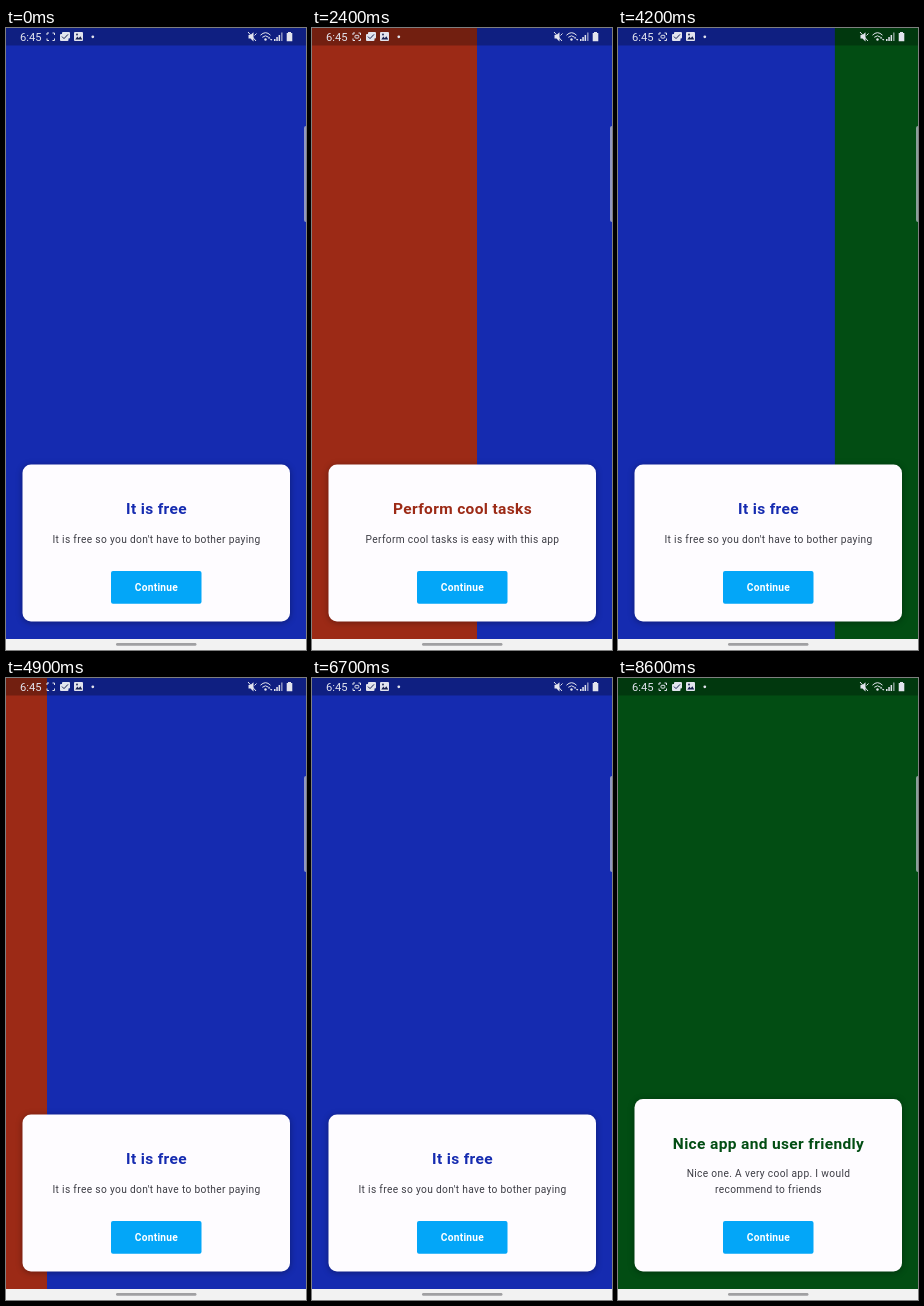
Recreate the animation shown at these times as an HTML page. Size 300x622 px, loop 8.7 s.

```html
<!DOCTYPE html>
<html lang="en">
<head>
<meta charset="utf-8">
<title>Onboarding</title>
<style>
  html, body { margin: 0; width: 100%; height: 100%; overflow: hidden; background: #152bb0; }
  svg { display: block; width: 100%; height: 100%; font-family: Roboto, sans-serif; }
  .card { fill: #fefcff; filter: drop-shadow(0 1px 3px rgba(0, 0, 0, .35)); }
  .title { font-size: 15.5px; font-weight: 700; letter-spacing: .35px; }
  .body { font-size: 10.2px; letter-spacing: .34px; fill: #3d3d45; }
  .label { font-size: 10.2px; font-weight: 700; letter-spacing: .25px; fill: #fff; }
  .step { visibility: hidden; }
  .step.on { visibility: visible; }
  .icons { fill: #e2e4ee; }
  .line { fill: none; stroke: #e2e4ee; }
  .cut { fill: none; stroke: #17204f; }
</style>
</head>
<body>
<svg viewBox="0 0 300 622" preserveAspectRatio="none">
  <g id="track">
    <rect width="300.5" height="612" fill="#9c2a16"/>
    <rect x="300" width="300.5" height="612" fill="#152bb0"/>
    <rect x="600" width="300" height="612" fill="#024d13"/>
  </g>

  <rect width="300" height="17.5" fill="#000" opacity=".27"/>
  <g class="icons">
    <text x="14" y="13" font-size="11.2">6:45</text>
    <path class="line" d="M41 7V5h2M46.500 5h2v2M48.500 10.500v2h-2M43 12.500h-2v-2"/>
    <rect id="rec" class="line" x="43" y="7.300" width="3.800" height="2.800" rx=".8"/>
    <rect x="56" y="4" width="8" height="6.500" rx="1"/>
    <rect x="54" y="6" width="8.500" height="7" rx="1"/>
    <path class="cut" d="M56 8.600l2 2 4-4.200"/>
    <rect x="68" y="4" width="9" height="9" rx="1"/>
    <path d="M69.300 11.500l2-3 1.500 1.700 1.500-2 2 3.300z" fill="#17204f"/>
    <circle cx="71" cy="6.500" r=".9" fill="#17204f"/>
    <circle cx="86.800" cy="8.800" r="1.400"/>

    <path d="M242.500 7h2l3-2.800v9.200l-3-2.800h-2z"/>
    <path class="line" d="M242 4l8 9M248.500 7.500l2-2"/>
    <path class="line" d="M254.500 7.200q5-5 10 0M256.300 9.300q3.200-3 6.400 0"/>
    <circle cx="259.500" cy="11.500" r="1.200"/>
    <path d="M262 10.500l1.200-1.800 1.200 1.800zM264 11l1.200 1.800 1.200-1.800z"/>
    <path d="M268 11h1.500v2H268zM270.300 9h1.500v4h-1.500zM272.600 7h1.500v6h-1.500z"/>
    <path d="M275 4.500h1.600V13H275z" opacity=".55"/>
    <path d="M282 4h3v1h1.300v8.200h-5.600V5H282z"/>
  </g>
  <rect x="298" y="98" width="4" height="96" rx="2" fill="#b9bcc8" opacity=".75"/>

  <rect id="card" class="card" x="16.500" y="436.500" width="267.500" height="157" rx="8.500"/>
  <g text-anchor="middle">
    <g class="step">
      <text class="title" x="150.500" y="486" fill="#9c2a16">Perform cool tasks</text>
      <text class="body" x="150.500" y="514.700">Perform cool tasks is easy with this app</text>
    </g>
    <g class="step on">
      <text class="title" x="150.500" y="486" fill="#152bb0">It is free</text>
      <text class="body" x="150.500" y="514.700">It is free so you don't have to bother paying</text>
    </g>
    <g class="step">
      <text class="title" x="150.500" y="470.700" fill="#024d13">Nice app and user friendly</text>
      <text class="body" x="150.500" y="499.200">Nice one. A very cool app. I would</text>
      <text class="body" x="150.500" y="514.700">recommend to friends</text>
    </g>
    <rect x="105" y="543" width="90.500" height="32.700" rx="2" fill="#03a6f8"/>
    <text class="label" x="150.400" y="563">Continue</text>
  </g>

  <rect y="611" width="300" height="11" fill="#f2f2f2"/>
  <rect x="110" y="615" width="80.500" height="2.800" rx="1.400" fill="#a0a0a2"/>
</svg>
<script>
  const LOOP = 8700, TICK = 100, WIDTH = 300;
  const $ = id => document.getElementById(id);
  const steps = document.querySelectorAll('.step');

  const linear = k => k;
  const easeIn = k => k * k;
  const easeOut = k => 1 - (1 - k) ** 2;
  const smooth = k => k * k * (3 - 2 * k);

  // [time, scroll offset, easing used to arrive there]
  const path = [
    [0, 300], [300, 220, easeIn], [900, 0, easeOut],
    [1900, 0, linear], [2400, 135, easeIn], [2700, 300, easeOut],
    [2800, 300, linear], [3100, 470, easeIn], [3500, 574, easeOut], [3700, 600, easeOut],
    [3800, 600, linear], [4100, 440, easeIn], [4500, 310, easeOut], [4600, 300, linear],
    [4900, 259, smooth], [5500, 238, linear], [5700, 238, linear], [6300, 300, smooth],
    [8200, 300, linear], [8600, 600, smooth], [LOOP, 600, linear]
  ];

  function scrollAt(t) {
    const i = path.findIndex(p => p[0] > t);
    const [t0, x0] = path[i - 1], [t1, x1, ease] = path[i];
    return x0 + (x1 - x0) * ease((t - t0) / (t1 - t0));
  }

  function draw(now) {
    const t = Math.floor(now % LOOP / TICK) * TICK;
    const x = scrollAt(t), page = Math.round(x / WIDTH);
    const top = page === 2 ? 421 : 436.5;
    $('track').setAttribute('transform', `translate(${-x} 0)`);
    steps.forEach((s, i) => s.classList.toggle('on', i === page));
    $('card').setAttribute('y', top);
    $('card').setAttribute('height', 593.5 - top);
    const beat = t % 1000;
    $('rec').style.opacity = beat >= 800 || beat < 50 ? 0 : 1;
  }

  const start = performance.now();
  function frame() {
    draw(performance.now() - start);
    requestAnimationFrame(frame);
  }
  frame();
</script>
</body>
</html>
```
